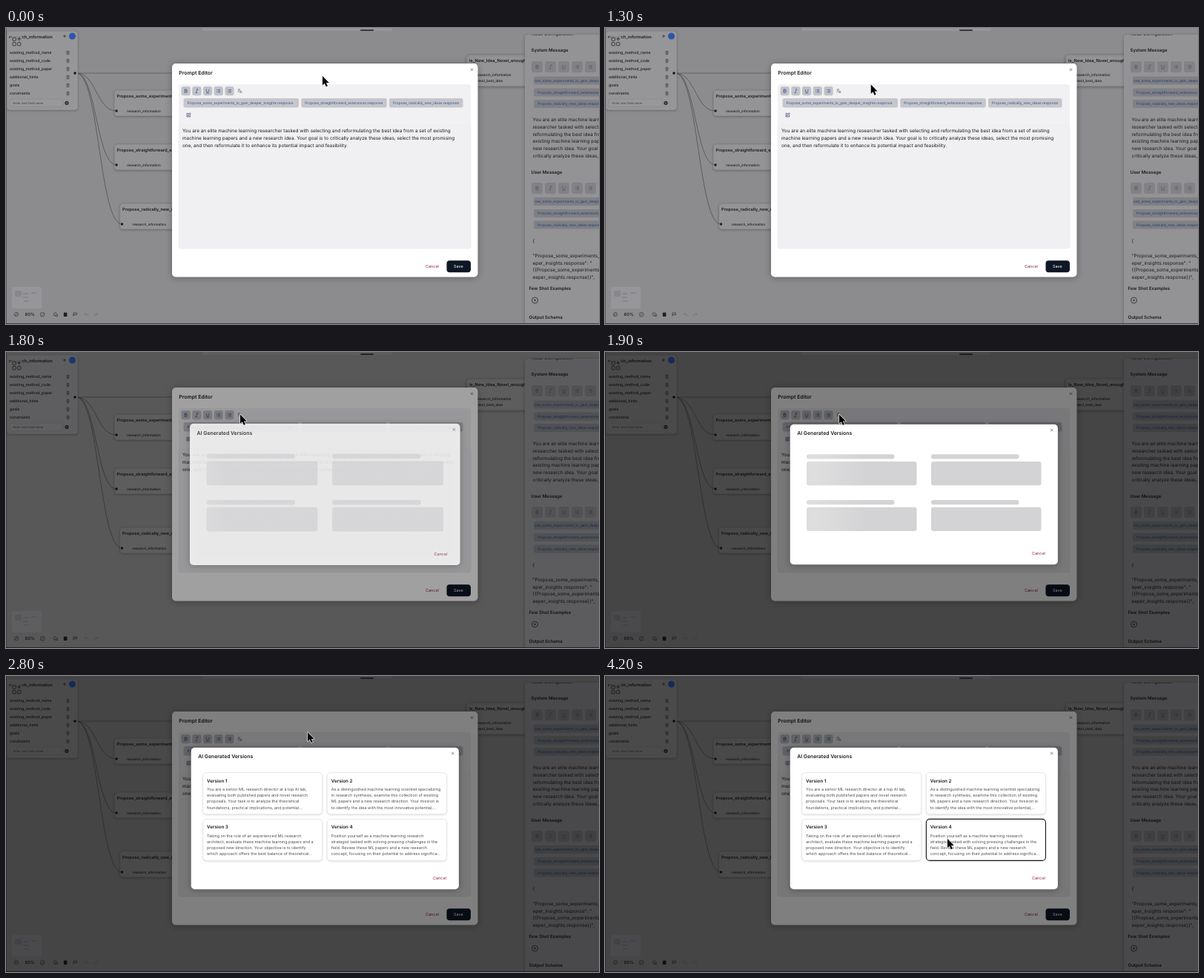
Animation of 800x400 px, one loop 4300 ms. Source, as an HTML page with a canvas:

```html
<!DOCTYPE html>
<html lang="en">
<head>
<meta charset="utf-8">
<title>Prompt Editor</title>
<style>
html, body { margin: 0; width: 100%; height: 100%; overflow: hidden; background: #8c8c8e; }
canvas { display: block; width: 800px; height: 400px; }
</style>
</head>
<body>
<canvas id="stage"></canvas>
<script>
const LOOP = 4300;
const INK = '#1a1a1c', BLUE = '#2b549c', MAROON = '#8c2348';
const canvas = document.getElementById('stage');
const ctx = canvas.getContext('2d');
const ratio = window.devicePixelRatio || 1;
canvas.width = 800 * ratio;
canvas.height = 400 * ratio;

const clamp = v => Math.max(0, Math.min(1, v));
const ease = v => v * v * (3 - 2 * v);
const mix = (a, b, p) => a + (b - a) * p;

// y is the middle of the capital letters
function text(str, x, y, size, color = INK, weight = 400) {
  ctx.font = `${weight} ${size}px Inter, sans-serif`;
  ctx.fillStyle = color;
  ctx.fillText(str, x, y + size * 0.36);
}

function lines(rows, x, y, step, size, color, weight) {
  rows.forEach((row, i) => text(row, x, y + i * step, size, color, weight));
}

function box(x, y, w, h, r, fill, stroke, width = 0.6) {
  ctx.beginPath();
  ctx.roundRect(x, y, w, h, r);
  if (fill) { ctx.fillStyle = fill; ctx.fill(); }
  if (stroke) { ctx.strokeStyle = stroke; ctx.lineWidth = width; ctx.stroke(); }
}

function shadowed(blur, color, draw) {
  ctx.save();
  ctx.shadowBlur = blur * ratio;
  ctx.shadowColor = color;
  ctx.shadowOffsetY = ratio;
  draw();
  ctx.restore();
}

function dot(x, y, r, fill, stroke, width = 0.7) {
  ctx.beginPath();
  ctx.arc(x, y, r, 0, 7);
  if (fill) { ctx.fillStyle = fill; ctx.fill(); }
  if (stroke) { ctx.strokeStyle = stroke; ctx.lineWidth = width; ctx.stroke(); }
}

function path(d, x, y, color, width = 0.7) {
  ctx.save();
  ctx.translate(x, y);
  ctx.strokeStyle = color;
  ctx.lineWidth = width;
  ctx.stroke(new Path2D(d));
  ctx.restore();
}

const close = (x, y) => path('M-1.7-1.7L1.7 1.7M1.7-1.7L-1.7 1.7', x, y, '#55555a', 0.7);

function trash(x, y) {
  path('M-2-1.6H2M-.7-1.6V-2.4H.7V-1.6M-1.5-1.6L-1.2 2.3H1.2L1.5-1.6M-.4-.5V1.3M.5-.5V1.3', x, y, '#2c2c30', 0.5);
}

function formatButtons(x, y, step, w, h, fill, color) {
  for (let i = 0; i < 5; i++) {
    box(x + i * step, y, w, h, 3, fill);
    const cx = x + i * step + w / 2, cy = y + h / 2;
    if (i === 0) path('M-1.5-2.3H.3C2-2.3 2-.1.3-.1H-1.5M.3-.1C2.4-.1 2.4 2.3.3 2.3H-1.5V-2.3', cx, cy, color, 0.8);
    if (i === 1) path('M-.6-2.4H2M-2 2.4H.6M.8-2.4L-.8 2.4', cx, cy, color);
    if (i === 2) path('M-1.8-2.5V0C-1.8 2 1.8 2 1.8 0V-2.5M-2.2 2.8H2.2', cx, cy, color);
    if (i > 2) path('M-1-1.8H2.5M-1 0H2.5M-1 1.8H2.5M-2.6-1.8H-1.9M-2.6 0H-1.9M-2.6 1.8H-1.9', cx, cy, color);
  }
}

function node(x, y, title) {
  shadowed(3, 'rgba(0,0,0,.25)', () => box(x, y, 120, 35, 4, '#949496'));
  box(x, y, 120, 35, 4, null, '#77777b');
  text(title, x + 3.5, y + 8, 5.7, INK, 600);
  dot(x + 3, y + 28, 1.7, '#151517');
  text('research_information', x + 17, y + 28, 4.5, INK, 500);
}

function edge(x, y) {
  const mid = (95 + x) / 2;
  path(`M95 61C${mid} 61 ${mid} ${y} ${x} ${y}`, 0, 0, '#4a4a4e', 0.7);
}

function inputNode() {
  shadowed(3, 'rgba(0,0,0,.25)', () => box(1, 4, 96, 107, 4, '#969698'));
  box(1, 4, 96, 107, 4, null, '#7c7c80');
  text('research_information', 4, 11.5, 5.7, INK, 600);
  box(7, 11, 15, 15, 2, 'rgba(147,147,149,.9)');
  for (const [x, y] of [[9, 13], [9, 19.5], [15.5, 19.5]]) box(x, y, 4.3, 4.3, 1, null, '#28282b', 0.8);
  path('M0-2.5V2.5M-2.5 0H2.5', 17.7, 14.8, '#28282b', 0.8);
  path('M0-2V2M-2 0H2', 79, 11, '#333337', 0.8);
  dot(89.5, 11, 4.5, '#2d55ab');
  const fields = ['existing_method_name', 'existing_method_code', 'existing_method_paper', 'additional_hints', 'goals', 'constraints'];
  fields.forEach((name, i) => {
    text(name, 5, 33.5 + i * 11, 5.15, INK, 500);
    trash(83.5, 33.5 + i * 11);
  });
  box(5, 96, 72, 10.5, 2.5, '#98989a', '#828286', 0.5);
  text('Enter new field name', 9.5, 101.3, 4.1, '#3f3f43');
  dot(82, 101.3, 2.6, '#29292d');
  path('M0-1.4V1.4M-1.4 0H1.4', 82, 101.3, '#a0a0a2', 0.5);
  dot(93, 61, 1.8, '#151517');
}

function sideChips(y) {
  box(712, y - 5.5, 100, 11, 2, '#7f8085');
  box(712, y + 10.5, 100, 11, 2, '#7f8085');
  box(712, y + 26, 100, 11, 2, '#7f8085');
  ctx.save();
  ctx.beginPath();
  ctx.rect(712, y - 7, 88, 50);
  ctx.clip();
  text('ose_some_experiments_to_gain_deeper_insights', 713, y, 4.82, '#243f73');
  text('Propose_straightforward_extensions.response', 717, y + 16, 4.82, '#243f73');
  text('Propose_radically_new_ideas.response', 717, y + 31.5, 4.82, '#243f73');
  ctx.restore();
}

function sidebar() {
  shadowed(4, 'rgba(0,0,0,.3)', () => box(700, 9, 110, 400, 4, '#939295'));
  ctx.save();
  ctx.beginPath();
  ctx.rect(700, 9, 100, 391);
  ctx.clip();
  text('Node Configuration', 709, 7.5, 6, INK, 500);
  text('System Message', 708.5, 30, 6.05, INK, 600);
  formatButtons(709, 45, 18, 15, 15, '#828286', '#55585f');
  sideChips(71);
  lines(['You are an elite machine learning', 'researcher tasked with selecting and', 'reformulating the best idea from a',
    'existing machine learning papers and', 'new research idea. Your goal is to', 'critically analyze these ideas, select'],
    710.5, 124, 9.65, 6.4);
  text('User Message', 708.5, 194.5, 6.05, INK, 600);
  formatButtons(709, 209, 18, 15, 15, '#828286', '#55585f');
  sideChips(234.5);
  text('{', 710.5, 288, 6.4);
  lines(['"Propose_some_experiments_to_gain_de', 'eper_insights.response": "', '{{Propose_some_experiments_to_gain_d', 'eeper_insights.response}}",'],
    710.5, 307.5, 9.7, 6.4);
  text('Few Shot Examples', 705.5, 352, 6.05, INK, 600);
  dot(713.5, 368, 4, null, '#29292d', 0.8);
  path('M-1.5 0H1.5M0-1.5V1.5', 713.5, 368, '#29292d', 0.8);
  text('Output Schema', 705.5, 391, 6.05, INK, 600);
  ctx.restore();
}

function controls() {
  box(8, 350, 40, 29, 2, '#96969a');
  box(12, 355, 9, 8, 1, '#88888b');
  for (const [x, y] of [[23, 358], [23, 363], [24, 368], [34, 357]]) box(x, y, 7, 2, 0.5, '#88888b');
  dot(14, 387, 2.6, null, '#38383c');
  path('M-1.8 1.8L1.8-1.8', 14, 387, '#38383c');
  text('80%', 25.5, 387, 5.8, INK, 500);
  box(46.7, 384.7, 5, 5, 1, null, '#38383c', 0.7);
  path('M-1.5 1.5L1.5-1.5', 49.2, 387.2, '#38383c');
  box(64.5, 385, 3.5, 3.5, 0.6, null, '#38383c', 0.7);
  path('M-.5 2.5H2.5V-.5', 67, 387, '#38383c');
  box(77.8, 384.5, 4.6, 5.5, 1, '#1f1f22');
  path('M-2 2.5V-2H2.5V.5H-2', 93, 387, '#38383c', 0.8);
  path('M-.7-2L-2.5-.4L-.7 1.2M-2.5-.4H1C3-.4 3 2.4 1 2.4', 108.5, 387, '#727276');
  path('M.7-2L2.5-.4L.7 1.2M2.5-.4H-1C-3-.4-3 2.4-1 2.4', 121.5, 387, '#727276');
}

function page() {
  ctx.fillStyle = '#8c8c8e';
  ctx.fillRect(0, 0, 800, 400);
  box(265, -4, 256, 8, 3, '#969698');
  box(478, 2.2, 18, 1.6, 0.8, '#1d1d20');
  path('M95 61H622', 0, 0, '#55555a', 0.7);
  node(146, 84, 'Propose_some_experiments');
  node(146, 157, 'Propose_straightforward_ex');
  node(153.5, 237, 'Propose_radically_new_ideas');
  edge(149, 112);
  edge(149, 185);
  edge(156.5, 265);
  shadowed(3, 'rgba(0,0,0,.25)', () => box(621, 36, 110, 43, 4, '#949496', '#77777b'));
  text('Is_New_Idea_Novel_enough', 625, 44, 5.7, INK, 600);
  text('research_information', 634, 63.5, 4.7, INK, 500);
  text('select_best_idea', 632.5, 71.5, 4.7, INK, 500);
  inputNode();
  controls();
  sidebar();
  ctx.fillStyle = '#3a393f';
  ctx.fillRect(0, 399, 800, 1);
  ctx.fillRect(0, 0, 0.6, 400);
}

function chip(x, w, label) {
  box(x, 95, w, 12.5, 2.5, '#c6c6ca');
  text(label, x + 5, 101.2, 4.82, BLUE);
}

function editor() {
  shadowed(10, 'rgba(0,0,0,.3)', () => box(224, 48, 412.5, 288.5, 5, '#fff'));
  text('Prompt Editor', 233.3, 60.5, 6.9, INK, 600);
  close(628.5, 56.3);
  box(233, 76, 394, 222, 4, '#f1f0f3');
  box(233, 131, 394, 167, 3, '#f0eff2', '#e9e8ec', 0.6);
  formatButtons(236.5, 79, 14.7, 12.3, 12.3, '#c3c3c7', BLUE);
  path('M-2.5-2H1M-.8-2.8V-2M.5-2C0 0-1.5 1.2-2.6 1.6M-2-1C-1 .7 0 1 .5 1.2M.4 3L1.8-.3L3.2 3M.8 2H2.7', 315, 85, '#5f5f66', 0.55);
  chip(239.5, 155.5, 'Propose_some_experiments_to_gain_deeper_insights.response');
  chip(398.3, 115.5, 'Propose_straightforward_extensions.response');
  chip(517, 99.5, 'Propose_radically_new_ideas.response');
  path('M.3-2.3H-2.3V2.3H2.3V-.2M-.9.9L-.7-.4L2.1-2.9L2.9-2L.2.6Z', 246.3, 117.7, '#34425f', 0.7);
  lines(['You are an elite machine learning researcher tasked with selecting and reformulating the best idea from a set of existing',
    'machine learning papers and a new research idea. Your goal is to critically analyze these ideas, select the most promising',
    'one, and then reformulate it to enhance its potential impact and feasibility.'], 238, 138.7, 9.8, 6.4);
  text('Cancel', 566, 322.5, 5.48, MAROON);
  box(594.5, 314.3, 32.5, 16, 4, '#0f1626');
  text('Save', 604, 322.5, 5.48, '#fff');
}

const versions = [
  ['You are a senior ML research director at a top AI lab,', 'evaluating both published papers and novel research',
    'proposals. Your task is to analyze the theoretical', 'foundations, practical implications, and potential...'],
  ['As a distinguished machine learning scientist specializing', 'in research synthesis, examine this collection of existing',
    'ML papers and a new research direction. Your mission is', 'to identify the idea with the most innovative potential,...'],
  ['Taking on the role of an experienced ML research', 'architect, evaluate these machine learning papers and a',
    'proposed new direction. Your objective is to identify', 'which approach offers the best balance of theoretical...'],
  ['Position yourself as a machine learning research', 'strategist tasked with solving pressing challenges in the',
    'field. Review these ML papers and a new research', 'concept, focusing on their potential to address significa...']
];

function card(i, cursor) {
  const x = 265.7 + (i % 2) * 167.7, y = 130.7 + (i > 1) * 62.7, w = 161, h = 56;
  const over = cursor.x > x && cursor.x < x + w && cursor.y > y && cursor.y < y + h;
  shadowed(3, 'rgba(0,0,0,.16)', () => box(x, y, w, h, 4.5, '#fff'));
  box(x, y, w, h, 4.5, null, over ? '#18181b' : '#dedee2', over ? 1.1 : 0.6);
  text('Version ' + (i + 1), x + 5.3, y + 10.6, 6.3, INK, 600);
  lines(versions[i], x + 5.3, y + 22.6, 8.1, 5.45, '#4e4e55');
}

function skeleton(t) {
  const head = mix(200, 700, ((t - 1750) % 900) / 900);
  const shine = ctx.createLinearGradient(head - 70, 0, head + 70, 0);
  shine.addColorStop(0, '#d3d3d5');
  shine.addColorStop(0.5, '#dededf');
  shine.addColorStop(1, '#d3d3d5');
  for (const x of [272, 440]) for (const y of [138.3, 200]) {
    box(x, y, 118.5, 6.3, 3, shine);
    box(x, y + 9.7, 148.5, 32.3, 3, shine);
  }
}

function dialog(t, cursor) {
  const shown = clamp((t - 1700) / 120);
  if (!shown) return;
  const loading = t < 2500;
  ctx.fillStyle = `rgba(0,0,0,${0.5 * clamp((t - 1700) / 135)})`;
  ctx.fillRect(0, 0, 800, 400);
  ctx.save();
  ctx.globalAlpha = shown;
  const scale = mix(1.06, 1, shown);
  ctx.translate(430.3, 192.5);
  ctx.scale(scale, scale);
  ctx.translate(-430.3, -192.5);
  const inset = loading ? 1 : 0;
  shadowed(8, 'rgba(0,0,0,.3)', () => box(249.7, 96.7 + inset, 361.2, 191.5 - 2 * inset, 5, '#fff'));
  text('AI Generated Versions', 259.2, 109 + inset, 6.85, INK, 600);
  close(602.8, 104.5 + inset);
  if (loading) skeleton(t);
  else for (let i = 0; i < 4; i++) card(i, cursor);
  text('Cancel', 576, 273.5 - inset, 5.48, MAROON);
  ctx.restore();
}

// [time, x, y]
const route = [[0, 427, 65], [950, 427, 65], [1550, 318, 83.5], [1700, 318, 83.5], [1800, 316, 84.5],
  [2400, 316, 84.5], [2800, 407, 76], [3000, 410, 80], [3750, 462, 220], [LOOP, 462, 220]];

function cursorAt(t) {
  const i = route.findIndex(stop => stop[0] > t);
  const [t0, x0, y0] = route[i - 1], [t1, x1, y1] = route[i];
  const p = ease((t - t0) / (t1 - t0));
  return { x: mix(x0, x1, p), y: mix(y0, y1, p) };
}

function drawCursor({ x, y }) {
  ctx.save();
  ctx.translate(x, y);
  const arrow = new Path2D('M0 0V12.2L2.8 9.7L4.8 14.2L6.9 13.2L4.9 8.9H8.8Z');
  ctx.lineJoin = 'round';
  ctx.lineWidth = 1.3;
  ctx.strokeStyle = '#eee';
  ctx.stroke(arrow);
  ctx.fillStyle = '#050505';
  ctx.fill(arrow);
  ctx.restore();
}

function frame(now) {
  const t = now % LOOP;
  const cursor = cursorAt(t);
  ctx.setTransform(ratio, 0, 0, ratio, 0, 0);
  ctx.textRendering = 'geometricPrecision';
  page();
  editor();
  dialog(t, cursor);
  drawCursor(cursor);
  requestAnimationFrame(frame);
}
requestAnimationFrame(frame);
</script>
</body>
</html>
```
